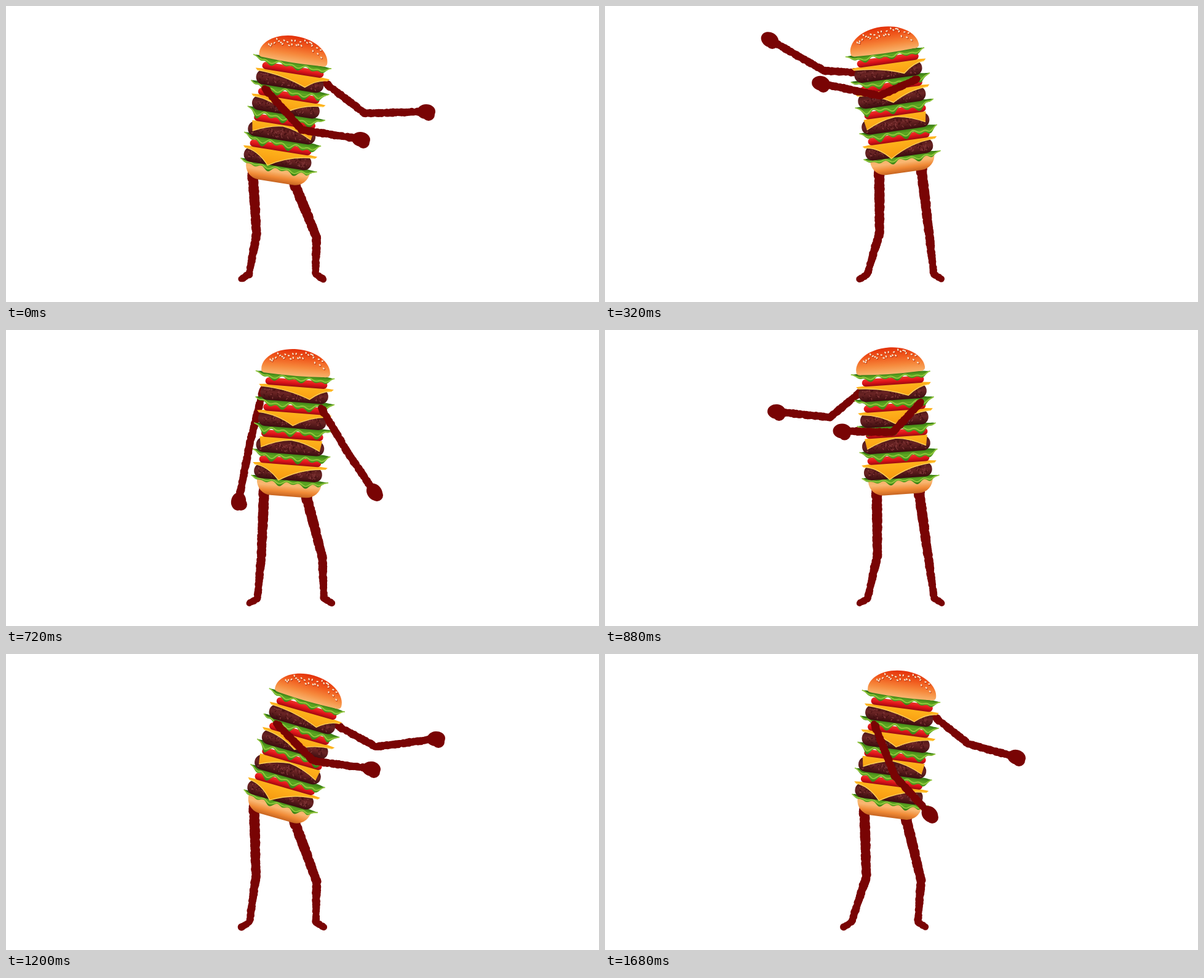
An HTML page with a canvas that plays this animation: 964 px wide and 482 px high, repeating every 1760 ms.

```html
<!DOCTYPE html>
<html lang="en">
<head>
<meta charset="utf-8">
<title>Dancing burger</title>
<style>
  html, body { margin: 0; height: 100%; overflow: hidden; background: #fff; }
  canvas { display: block; width: 100vw; height: 100vh; }
</style>
</head>
<body>
<canvas width="964" height="482"></canvas>
<script>
const ctx = document.querySelector('canvas').getContext('2d');
const STEPS = 22, STEP_MS = 80, BEATS = 3;
const LIMB = '#790404';

// Key poses of one swing; the loop runs through it three times.
// phase, foot of the stack x y, tilt in degrees, left hand x y, right hand x y
const KEYS = [
  [0, 439, 287, 9, 577, 217, 683, 172],
  [1, 439, 267, 16, 594, 187, 699, 138],
  [5, 459, 271, 4.5, 378, 279, 599, 264],
  [10, 478, 264, 0, 290, 211, 420, 203],
  [12, 487, 271, -8, 268, 55, 351, 126],
  [15, 482, 267, -5, 253, 115, 335, 170],
  [17, 464, 258, 4, 435, 267, 574, 268],
  [19, 460, 266, 7.5, 528, 261, 669, 168]
];

const mix = (a, b, t) => a + (b - a) * t;

function poseAt(phase) {
  const i = KEYS.findLastIndex(k => k[0] <= phase);
  const from = KEYS[i], to = KEYS[(i + 1) % KEYS.length];
  const t = (phase - from[0]) / ((to[0] || STEPS) - from[0]);
  const [, x, y, tilt, lx, ly, rx, ry] = from.map((v, n) => mix(v, to[n], t));
  return { x, y, tilt: tilt * Math.PI / 180, hands: { '-1': [lx, ly], 1: [rx, ry] } };
}

// Point given in upright stack coordinates, moved onto the stage
function onBody({ x, y, tilt }, dx, dy) {
  const c = Math.cos(tilt), s = Math.sin(tilt);
  return [x + dx * c - dy * s, y + dx * s + dy * c];
}

function seeded(seed) {
  return () => (seed = seed * 16807 % 2147483647) / 2147483647;
}

function fillPath(color, trace) {
  ctx.beginPath();
  trace();
  ctx.fillStyle = color;
  ctx.fill();
}

function blend(y0, y1, ...colors) {
  const g = ctx.createLinearGradient(0, y0, 0, y1);
  colors.forEach((c, i) => g.addColorStop(i / (colors.length - 1), c));
  return g;
}

// Rough brush stroke through the joints, tapering from w0 to w1
function limb(joints, w0, w1) {
  const rnd = seeded(31);
  fillPath(LIMB, () => {
    for (let i = 1; i < joints.length; i++) {
      const [x, y] = joints[i - 1], [x2, y2] = joints[i];
      const len = Math.hypot(x2 - x, y2 - y);
      for (let d = 0; d < len; d += 1.5) {
        const along = Math.min(1, (i - 1 + d / len) / 2);
        const r = mix(w0, w1, along) / 2 + rnd() * 1.6 - 0.9;
        const px = mix(x, x2, d / len) + rnd() - 0.5, py = mix(y, y2, d / len) + rnd() - 0.5;
        ctx.moveTo(px + r, py);
        ctx.arc(px, py, r, 0, 7);
      }
    }
  });
}

function arm(pose, side, theta, inFront) {
  const shoulder = inFront ? onBody(pose, side * 42, -148) : onBody(pose, side * 54, -172);
  const [hx, hy] = pose.hands[side], reach = Math.cos(theta);
  // The elbow sags while the arm is stretched to either side.
  const elbow = [(shoulder[0] + hx) / 2 - 18 * reach, (shoulder[1] + hy) / 2 + 26 * reach ** 2];
  limb([shoulder, elbow, [hx, hy]], 12, 12);
  const aim = Math.atan2(hy - elbow[1], hx - elbow[0]);
  fillPath(LIMB, () => {
    ctx.ellipse(hx, hy, 15, 12, aim, 0, 7);
    ctx.ellipse(hx + 4, hy + 5, 10, 10, 0, 0, 7);
  });
}

function leg(pose, side, theta) {
  const hip = side < 0 ? onBody(pose, -40, -10) : onBody(pose, 28, -6);
  const ankle = [465 + side * 54 - 16 * Math.cos(theta), 437];
  const bulge = side < 0 ? 10 - 8 * Math.sin(theta) : 8 + 8 * Math.cos(theta);
  const knee = [mix(hip[0], ankle[0], 0.6) + bulge, mix(hip[1], ankle[1], 0.6)];
  limb([hip, knee, ankle, [ankle[0] + side * 13, 445]], 17, 11);
}

function lettuce(x0, x1, y, h, seed) {
  const wave = t => Math.sin(t * 37 + seed) * 0.6 + Math.sin(t * 19 + seed * 2) * 0.5;
  const edge = (drop, back) => {
    for (let i = 0; i <= 60; i++) {
      const t = back ? 1 - i / 60 : i / 60;
      const pinch = Math.min(1, t * 8, (1 - t) * 8);
      ctx.lineTo(mix(x0, x1, t), y + t * 3 + pinch * drop * h * (0.75 + 0.35 * wave(t)));
    }
  };
  fillPath(blend(y, y + h + 3, '#2a6d10', '#5fa922', '#357f12'), () => {
    edge(-0.1);
    edge(1, true);
  });
  ctx.beginPath();
  edge(0.7);
  ctx.lineWidth = 1.8;
  ctx.strokeStyle = '#93c83e';
  ctx.stroke();
}

function tomato(y) {
  fillPath(blend(y, y + 13, '#ef3a2c', '#dd1219', '#8e0a10'), () => ctx.roundRect(426, y, 101, 12, 6));
}

function patty(y, rnd) {
  fillPath(blend(y, y + 25, '#461214', '#6a2424', '#3a0c0e'), () => ctx.roundRect(419, y, 111, 25, [14, 14, 13, 13]));
  for (let i = 0; i < 80; i++) {
    const x = mix(426, 522, rnd()), py = y + 7 + rnd() * 14;
    fillPath(i % 2 ? '#430f12' : '#83393a', () => ctx.ellipse(x, py, 1 + rnd() * 1.6, 0.7, rnd() * 3, 0, 7));
  }
}

function cheese(y, corner, dripX, drip) {
  const x0 = corner ? 424 : 416, x1 = corner ? 526 : 538;
  const low = y + 5 + corner;
  const lower = () => {
    ctx.lineTo(x1 - 3, low);
    ctx.quadraticCurveTo(mix(x1, dripX, 0.55), y + 6, dripX, y + drip);
    ctx.quadraticCurveTo(mix(x0, dripX, 0.55), y + 6, x0 + 3, low);
  };
  fillPath(blend(y, y + 24, '#ffb41c', '#f89c12'), () => {
    ctx.moveTo(x0, y + 2);
    ctx.quadraticCurveTo(477, y - 4, x1, y + 2);
    lower();
  });
  ctx.beginPath();
  lower();
  ctx.lineWidth = 1.4;
  ctx.strokeStyle = '#ffd257';
  ctx.stroke();
}

function topBun(rnd) {
  fillPath(blend(24, 68, '#e3300a', '#f0581c', '#f6893c', '#f8b872'), () => {
    ctx.moveTo(418, 60);
    ctx.bezierCurveTo(417, 42, 440, 24, 473, 24);
    ctx.bezierCurveTo(507, 24, 530, 43, 530, 60);
    ctx.quadraticCurveTo(530, 67, 520, 66);
    ctx.quadraticCurveTo(473, 69, 426, 66);
    ctx.quadraticCurveTo(417, 66, 418, 60);
  });
  for (let i = 0; i < 28; i++) {
    const across = (i + rnd()) / 14 - 1;
    const x = 474 + across * 46, y = 27 + 13 * across ** 2 + rnd() * 14, turn = rnd() * 3;
    fillPath('#b8340c', () => ctx.ellipse(x + 0.7, y + 0.8, 2, 1.4, turn, 0, 7));
    fillPath('#fbe3c8', () => ctx.ellipse(x, y, 1.8, 1.2, turn, 0, 7));
  }
}

function burger({ x, y, tilt }) {
  const rnd = seeded(77);
  ctx.save();
  ctx.translate(x, y);
  ctx.rotate(tilt);
  ctx.translate(-478, -264);
  fillPath(blend(238, 265, '#f5b365', '#f9b772', '#f08a36', '#c2601e'), () => {
    ctx.roundRect(425, 237, 105, 27, [4, 4, 30, 30]);
  });
  // Cheese of each row: corner drop, drip position, drip depth
  const drips = [[0, 500, 21], [0, 476, 23], [14, 475, 4], [0, 460, 28]];
  for (let row = 3; row >= 0; row--) {
    const top = 73 + row * 42.6;
    lettuce(412 + row, 541, top + 33, row < 3 ? 16 : 12, row * 1.9 + 1);
    patty(top + 12, rnd);
    cheese(top + 10, ...drips[row]);
    tomato(top);
  }
  lettuce(409, 538, 64, 12, 5);
  topBun(rnd);
  ctx.restore();
}

function draw(now) {
  const phase = Math.floor(now / STEP_MS) % STEPS * BEATS % STEPS;
  const theta = phase / STEPS * Math.PI * 2;
  const pose = poseAt(phase);
  // The front arm changes four times per swing.
  const front = (phase > 3 && phase < 8) || (phase > 10 && phase < 16) ? 1 : -1;
  ctx.fillStyle = '#fff';
  ctx.fillRect(0, 0, 964, 482);
  leg(pose, -1, theta);
  leg(pose, 1, theta);
  arm(pose, -front, theta, false);
  burger(pose);
  arm(pose, front, theta, true);
}

function tick() {
  draw(performance.now());
  requestAnimationFrame(tick);
}
tick();
</script>
</body>
</html>
```
